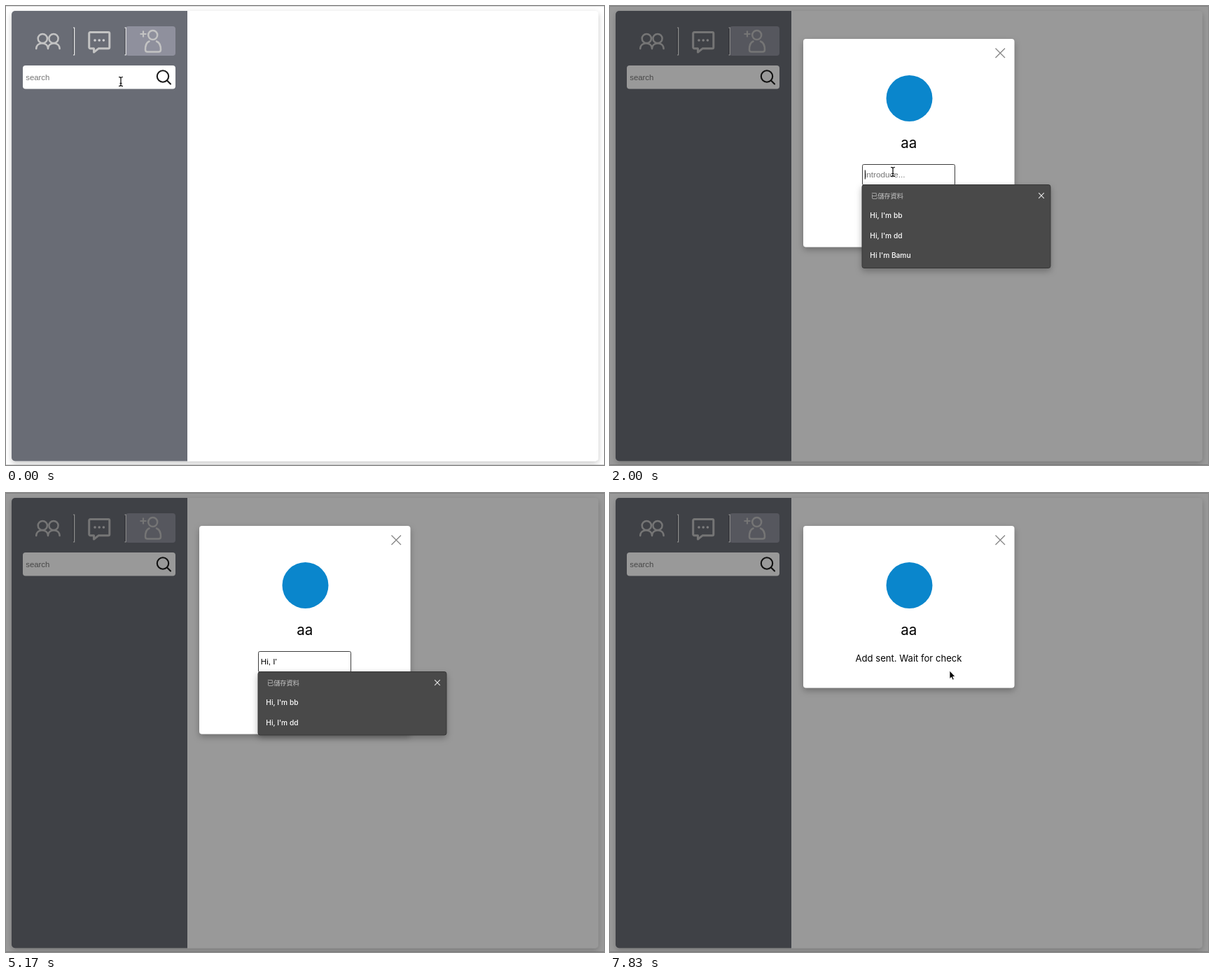
Recreate the animation shown at these times as an HTML page. Size 854 px wide and 656 px high, loop 8000 ms.

```html
<!DOCTYPE html>
<html lang="en">
<head>
<meta charset="utf-8">
<title>Add friend</title>
<style>
  html, body { margin: 0; width: 100%; height: 100%; overflow: hidden; background: #fff; }
  svg { display: block; width: 100vw; height: 100vh; }
  text { white-space: pre; }
  .field { font-family: "Liberation Sans", Arial, sans-serif; }
  .ui { font-family: Inter, "Noto Sans", sans-serif; }
  .cjk { font-family: "Noto Sans CJK TC", "Noto Sans CJK", sans-serif; }
  .line { fill: none; stroke-linecap: round; stroke-linejoin: round; }
</style>
</head>
<body>
<svg viewBox="0 0 854 656">
  <defs>
    <filter id="shade" x="-20%" y="-20%" width="140%" height="140%">
      <feDropShadow dx="0" dy="4" stdDeviation="5" flood-opacity=".28"/>
    </filter>
    <filter id="soft" x="-10%" y="-10%" width="120%" height="120%">
      <feDropShadow dx="0" dy="3" stdDeviation="4" flood-opacity=".22"/>
    </filter>
  </defs>

  <rect width="854" height="656" fill="#fff"/>
  <path d="M0 .5H854M0 655.5H854" stroke="#d8d8d8"/>
  <rect x="8" y="7" width="838" height="643.5" rx="5" fill="#fff" filter="url(#soft)"/>
  <path d="M259 7V650.5H13a5 5 0 0 1-5-5V12a5 5 0 0 1 5-5Z" fill="#696c75"/>

  <rect x="171" y="29" width="71" height="42" rx="4" fill="#8f909d"/>
  <g class="line" stroke="#c3c3c3" stroke-width="2.5">
    <circle cx="52.3" cy="46.5" r="6.6"/>
    <circle cx="68" cy="46.5" r="6.6"/>
    <path d="M43.2 61C43.2 50.5 60 50.5 60 61C60 50.5 76.6 50.5 76.6 61"/>
    <path stroke-width="3" d="M120.5 37.5H146a1.8 1.8 0 0 1 1.8 1.8V59a1.8 1.8 0 0 1-1.8 1.8H132L125.5 66V60.8H120.5a1.8 1.8 0 0 1-1.8-1.8V39.300a1.8 1.8 0 0 1 1.8-1.8Z"/>
    <circle cx="209.700" cy="41.500" r="6.500"/>
    <path d="M204.500 50.500C200.500 52 199 56 199 62.500Q199 65.500 202 65.500H218Q221 65.500 221 62.500C221 56 219 52 215 50.500"/>
    <path stroke-width="2.2" stroke-linecap="butt" d="M191.500 40H200.500M196 35.500V44.500"/>
  </g>
  <g fill="#d0d0d2">
    <circle cx="127" cy="49" r="1.800"/><circle cx="133.200" cy="49" r="1.800"/><circle cx="139.400" cy="49" r="1.800"/>
  </g>
  <g fill="none" stroke-width="1.200">
    <path d="M96 31H97.600V70H96M169.500 31H171.200V70H169.500" stroke="#eee"/>
    <path d="M96.300 32V69M169.900 32V69" stroke="#494b52" stroke-width="1"/>
  </g>

  <rect x="24" y="85" width="218" height="33.500" rx="4" fill="#fff"/>
  <text id="query" class="field" x="28.200" y="106" font-size="11.400"></text>
  <path id="queryCaret" stroke="#000"/>
  <g class="line" stroke="#1b1b1b" stroke-width="2.100">
    <circle cx="224" cy="100.500" r="8.200"/><path d="M230 106.500L235 111.500"/>
  </g>

  <g id="dialog">
    <rect width="854" height="656" fill="#000" opacity=".4"/>
    <rect id="panel" x="276" y="47" width="301.500" rx="4" fill="#fff" filter="url(#shade)"/>
    <path d="M550.500 60.500L564 74M564 60.500L550.500 74" stroke="#858585" stroke-width="1.300"/>
    <circle cx="427.500" cy="132" r="33" fill="#0a86cc"/>
    <text class="ui" x="426.700" y="203" font-size="20.500" text-anchor="middle">aa</text>
    <g id="form">
      <rect id="box" x="360.500" y="226.500" width="132" height="29.500" rx="2" fill="#fff"/>
      <text id="intro" class="field" x="363.700" y="245" font-size="11.700"></text>
      <path id="introCaret" stroke="#000"/>
      <path d="M412.500 285.500H440.500M426.500 271.500V299.500" stroke="#000" stroke-width="3"/>
    </g>
    <text id="sent" class="ui" x="426.500" y="240.500" font-size="13.100" text-anchor="middle">Add sent. Wait for check</text>
    <g id="popup">
      <rect id="sheet" x="360" y="255.500" width="269" rx="3" fill="#4a4a4a" stroke="#363636" filter="url(#shade)"/>
      <text class="cjk" x="373" y="274.600" font-size="9.200" fill="#c6c6c6">已儲存資料</text>
      <path d="M612.200 267.200L619.800 274.800M619.800 267.200L612.200 274.800" stroke="#e8e8e8" stroke-width="1.100"/>
      <g class="ui" font-size="10.200" font-weight="500" fill="#fff">
        <text x="371.300" y="303">Hi, I'm bb</text>
        <text x="371.300" y="331.500">Hi, I'm dd</text>
        <text id="third" x="371.300" y="360">Hi I'm Bamu</text>
      </g>
    </g>
  </g>

  <g id="beam" fill="none">
    <path d="M-3-6.500Q0-6.500 0-5Q0-6.500 3-6.500M0-5V5M-3 6.500Q0 6.500 0 5Q0 6.500 3 6.500M-1.500 2.500H1.500" stroke="#fff" stroke-width="2.600" opacity=".7"/>
    <path d="M-3-6.500Q0-6.500 0-5Q0-6.500 3-6.500M0-5V5M-3 6.500Q0 6.500 0 5Q0 6.500 3 6.500M-1.500 2.500H1.500" stroke="#000" stroke-width="1.200"/>
  </g>
  <path id="arrow" d="M0 0V11.500L2.600 9.200L4.400 13.200L6.300 12.300L4.600 8.500H8Z" fill="#000" stroke="#fff" stroke-width=".8"/>
</svg>

<script>
const LOOP = 8000, STEP = 1000 / 6;
const el = {};
document.querySelectorAll('[id]').forEach(n => el[n.id] = n);

const start = {
  query: '', queryCaret: false, intro: '', introCaret: false,
  open: false, focus: false, rows: 0, sent: false, pointer: 'beam'
};

// Each entry changes the interface from that moment on.
const events = [
  [170, { queryCaret: true }],
  [500, { query: 'a' }],
  [670, { query: 'aa', pointer: '' }],
  [1000, { query: '', queryCaret: false, open: true }],
  [1170, { pointer: 'arrow' }],
  [1670, { pointer: 'beam' }],
  [1830, { focus: true, introCaret: true }],
  [2000, { rows: 3 }],
  [2330, { intro: 'H', pointer: '' }],
  [2830, { intro: 'Hi' }],
  [3500, { intro: 'Hi,', rows: 2 }],
  [3670, { intro: 'Hi, ' }],
  [4000, { intro: 'Hi, I' }],
  [4330, { intro: "Hi, I'" }],
  [4670, { intro: "Hi, I'n", rows: 0 }],
  [5000, { intro: "Hi, I'", rows: 2 }],
  [5170, { introCaret: false }],
  [5330, { intro: "Hi, I'm", introCaret: true }],
  [5500, { intro: "Hi, I'm " }],
  [5830, { intro: "Hi, I'm B", rows: 0 }],
  [6000, { intro: "Hi, I'm Ba" }],
  [6170, { intro: "Hi, I'm Bam" }],
  [6330, { intro: "Hi, I'm Bamu" }],
  [6500, { pointer: 'beam' }],
  [6670, { pointer: 'arrow' }],
  [7170, { sent: true }]
];

const track = [
  [0, 164, 108], [330, 164, 108], [500, 198, 108], [1000, 198, 108],
  [1670, 396, 232], [2000, 404, 237], [6330, 404, 237],
  [6830, 428, 287], [7660, 428, 287], [7830, 485, 254]
];

function pointerAt(t) {
  const i = track.findIndex(k => k[0] > t);
  if (i < 0) return track[track.length - 1].slice(1);
  const [t0, x0, y0] = track[i - 1], [t1, x1, y1] = track[i];
  const u = (t - t0) / (t1 - t0), e = u * u * (3 - 2 * u);
  return [x0 + (x1 - x0) * e, y0 + (y1 - y0) * e];
}

function show(node, on) {
  node.setAttribute('display', on ? 'inline' : 'none');
}

function setField(node, caret, value, hint, caretOn, top, height) {
  node.textContent = value || hint;
  node.setAttribute('fill', value ? '#000' : '#757575');
  const x = +node.getAttribute('x') + (value ? node.getComputedTextLength() : 0) + .6;
  caret.setAttribute('d', `M${x} ${top}v${height}`);
  show(caret, caretOn);
}

function render(time) {
  const t = Math.floor((time % LOOP + 5) / STEP) * STEP;
  const s = { ...start };
  for (const [at, change] of events) if (at <= t + 5) Object.assign(s, change);

  show(el.dialog, s.open);
  show(el.form, !s.sent);
  show(el.sent, s.sent);
  show(el.popup, s.rows > 0);
  show(el.third, s.rows === 3);
  setField(el.query, el.queryCaret, s.query, 'search', s.queryCaret, 95, 14);
  setField(el.intro, el.introCaret, s.intro, 'introduce...', s.introCaret && !s.sent, 234.5, 13);
  el.panel.setAttribute('height', s.sent ? 231.5 : 297.5);
  el.sheet.setAttribute('height', 33.5 + 28.5 * s.rows);
  el.box.setAttribute('stroke', s.focus ? '#3c3c3c' : '#767676');

  const [x, y] = pointerAt(t);
  for (const name of ['beam', 'arrow']) {
    show(el[name], s.pointer === name);
    el[name].setAttribute('transform', `translate(${x} ${y})`);
  }
}

function tick() {
  render(performance.now());
  requestAnimationFrame(tick);
}
tick();
</script>
</body>
</html>
```
